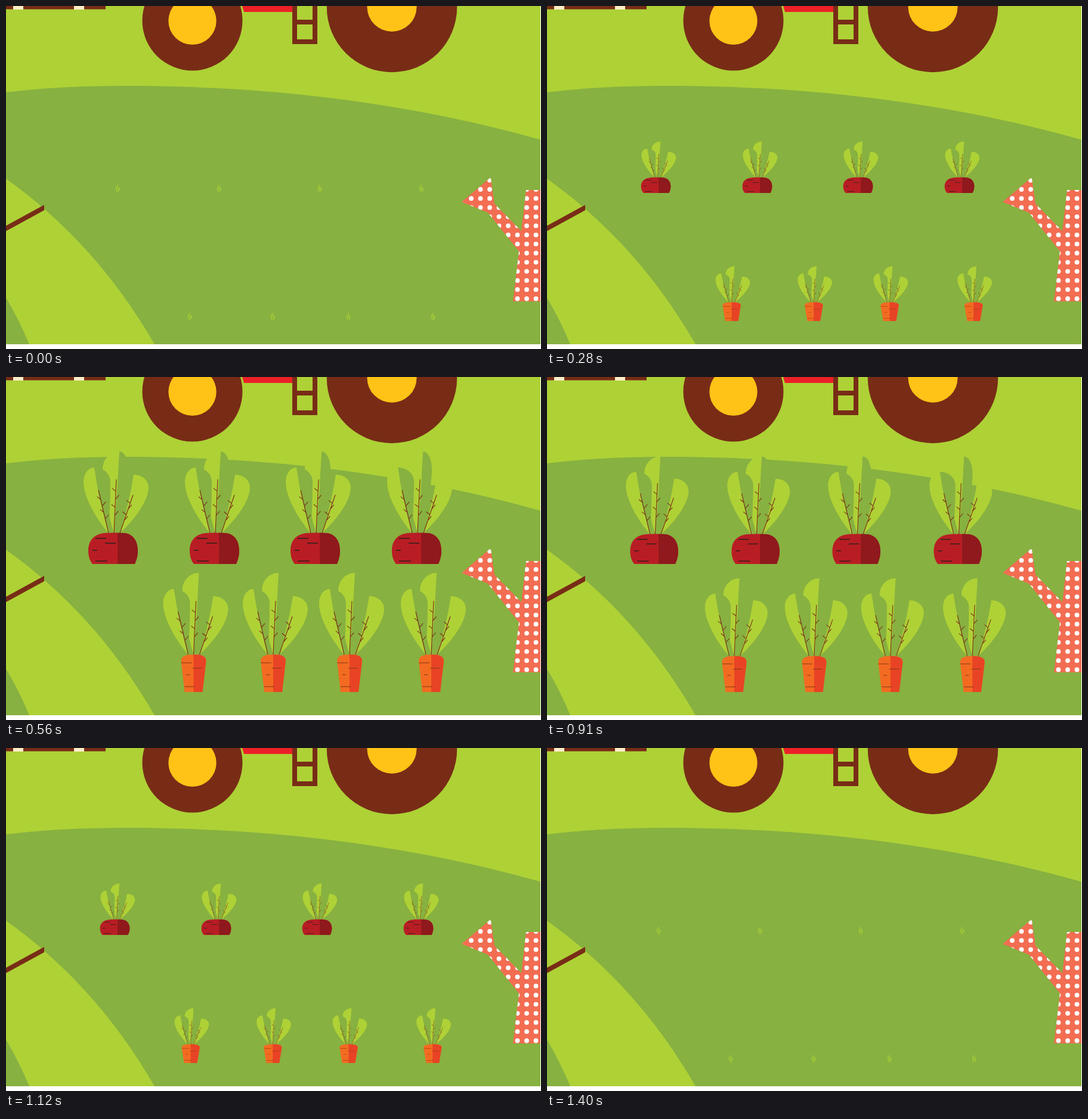
An HTML page with a canvas for the animation above (1.47 s loop, 897 px wide and 576 px high).

```html
<!DOCTYPE html>
<html lang="en">
<head>
<meta charset="utf-8">
<title>Vegetable field</title>
<style>
html, body { margin: 0; width: 100%; height: 100%; overflow: hidden; background: #fff; }
canvas { display: block; }
</style>
</head>
<body>
<canvas id="stage" width="897" height="576"></canvas>
<script>
const ctx = document.getElementById('stage').getContext('2d');
const LIGHT = '#aed136', DARK = '#87b140', BROWN = '#782c16', YELLOW = '#ffc216';
const W = 896, H = 568, STEP = 70, LOOP = 1470, LAST = 8, HOLD_END = 910;

// Leaf points are relative to the top of the root
const centreLeaf = { tip: [9, -137], edge: -19, base: 0, shade: 24, vein: [4, -90] };
const leftLeaf = { tip: [-33, -110], edge: -51, base: -9, shade: -6, vein: [-26, -72] };
const rightLeaf = { tip: [33, -98], edge: 58, base: 10, vein: [32, -64] };

const beet = {
  from: [187, 357, 526, 696], to: [187, 357, 526, 696],
  ground: 314, height: 52, startWidth: .2, lean: -6,
  colors: ['#b91d24', '#8f191c'], mark: '#3d2018', markWidth: 1.7,
  root: new Path2D('M-49-22C-49-41-38-51-20-52Q-5-53 10-52C25-51 34-40 34-22C34-12 31-5 29 0H-42C-46-5-49-12-49-22Z'),
  marks: [[-37, -43, 18], [-21, -35, 18], [-42, -23, 8], [-37, -5, 20]]
};
const carrot = {
  from: [308, 447, 574, 716], to: [314.5, 448, 576, 713],
  ground: 529, height: 63, startWidth: .45, lean: 0,
  colors: ['#f36b21', '#e84325'], mark: '#8a3a16', markWidth: 1.1,
  root: new Path2D('M-21-52C-21-60-14-63 0-63C14-63 21-60 21-52L15 0H-15Z'),
  marks: [[-21, -49, 18], [-2, -40, 16], [-12, -29, 6], [-15, -9, 17]]
};

const mix = (a, b, t) => a + (b - a) * t;
const ease = u => (1 - Math.cos(Math.PI * u)) / 2;

function fill(color, path) {
  ctx.fillStyle = color;
  ctx.fill(typeof path === 'string' ? new Path2D(path) : path);
}

function box(color, x, y, w, h) {
  ctx.fillStyle = color;
  ctx.fillRect(x, y, w, h);
}

function disc(color, x, y, r) {
  ctx.fillStyle = color;
  ctx.beginPath();
  ctx.arc(x, y, r, 0, Math.PI * 2);
  ctx.fill();
}

function drawField() {
  box(LIGHT, 0, 0, W, H);
  box(BROWN, 0, 0, 167, 5.5);
  for (const x of [12, 114]) box('#fdeec8', x, 0, 17, 6);
  fill('#ec2027', 'M396 0L399 10H481V0Z');
  box(BROWN, 480, 0, 42, 64);
  box(LIGHT, 488, 0, 26, 23);
  box(LIGHT, 488, 31, 26, 25);
  disc(BROWN, 312.5, 24.5, 84);
  disc(YELLOW, 312.5, 24.8, 40.2);
  disc(BROWN, 647, 2, 109.2);
  disc(YELLOW, 647, 1.5, 41.5);
  fill(DARK, 'M0 145Q90 134 200 134C420 134 660 158 896 224.5V568H0Z');
  fill(LIGHT, 'M0 290C95 358 180 448 249 568H0Z');
  fill(DARK, 'M0 490Q22 527 39 568H0Z');
  fill(BROWN, 'M0 369L64 334V343L0 378Z');
}

function drawScarecrow() {
  ctx.save();
  ctx.clip(new Path2D('M764 329L811 289L813 290L819 332L864 378L872 309H896V496H850L860 412L808 347Z'));
  box('#f26d52', 760, 285, 136, 215);
  for (let x = 0; x < 9; x++)
    for (let y = 0; y < 15; y++)
      disc('#fff', 888.5 - x * 15.5, 491.5 - y * 15.3, 3.9);
  ctx.restore();
}

function drawHalf(color, { tip: [x, y], base }, edge) {
  ctx.fillStyle = color;
  ctx.beginPath();
  ctx.moveTo(x, y);
  ctx.bezierCurveTo(mix(x, edge, .55), y, edge, y * .91, edge, y * .78);
  ctx.bezierCurveTo(edge, y * .55, mix(base, edge, .5), y * .22, base, 0);
  ctx.quadraticCurveTo(mix(x, base, .33), y * .5, x, y);
  ctx.fill();
}

function drawVein({ vein: [x, y], base }) {
  ctx.strokeStyle = BROWN;
  ctx.lineWidth = 1.1;
  ctx.beginPath();
  ctx.moveTo(x, y);
  ctx.lineTo(base, 0);
  for (let i = 0; i < 4; i++) {
    const t = .22 + i * .15, side = i % 2 ? 1 : -1;
    const bx = mix(x, base, t), by = y * (1 - t);
    ctx.moveTo(bx, by);
    ctx.lineTo(bx + side * 6, by - 6 - side);
  }
  ctx.stroke();
}

function drawLeaves(x, y, sx, sy) {
  ctx.save();
  ctx.translate(x, y);
  ctx.scale(sx, sy);
  for (const leaf of [centreLeaf, leftLeaf, rightLeaf]) {
    if (leaf.shade) drawHalf(DARK, leaf, leaf.shade);
    drawHalf(LIGHT, leaf, leaf.edge);
  }
  if (sy > .2) [centreLeaf, leftLeaf, rightLeaf].forEach(drawVein);
  ctx.restore();
}

function drawRoot(veg, x, sx, sy) {
  if (!sy) return;
  ctx.save();
  ctx.translate(x, veg.ground);
  ctx.scale(sx, sy);
  fill(veg.colors[0], veg.root);
  ctx.clip(veg.root);
  box(veg.colors[1], 0, -70, 60, 70);
  for (const [mx, my, len] of veg.marks) box(veg.mark, mx, my - veg.markWidth / 2, len, veg.markWidth);
  ctx.restore();
}

function drawRow(veg, step) {
  const grown = ease(step / LAST), drift = grown ** 2;
  const top = veg.ground - veg.height * grown;
  veg.from.forEach((from, i) => {
    const x = mix(from, veg.to[i], drift);
    drawLeaves(x + veg.lean * drift, top, mix(.06, 1, grown), mix(.1, 1, grown ** 1.4));
    drawRoot(veg, x, mix(veg.startWidth, 1, grown), grown);
  });
}

function stepAt(ms) {
  const t = ms % LOOP;
  if (t < HOLD_END) return Math.min(LAST, Math.floor(t / STEP));
  return Math.max(0, LAST - 1 - Math.floor((t - HOLD_END) / STEP));
}

let shown = -1;
function draw(step) {
  if (step === shown) return;
  shown = step;
  box('#fff', 0, 0, 897, 576);
  drawField();
  drawScarecrow();
  drawRow(beet, step);
  drawRow(carrot, step);
}

const start = performance.now();
function tick() {
  draw(stepAt(performance.now() - start));
  requestAnimationFrame(tick);
}
tick();
</script>
</body>
</html>
```
